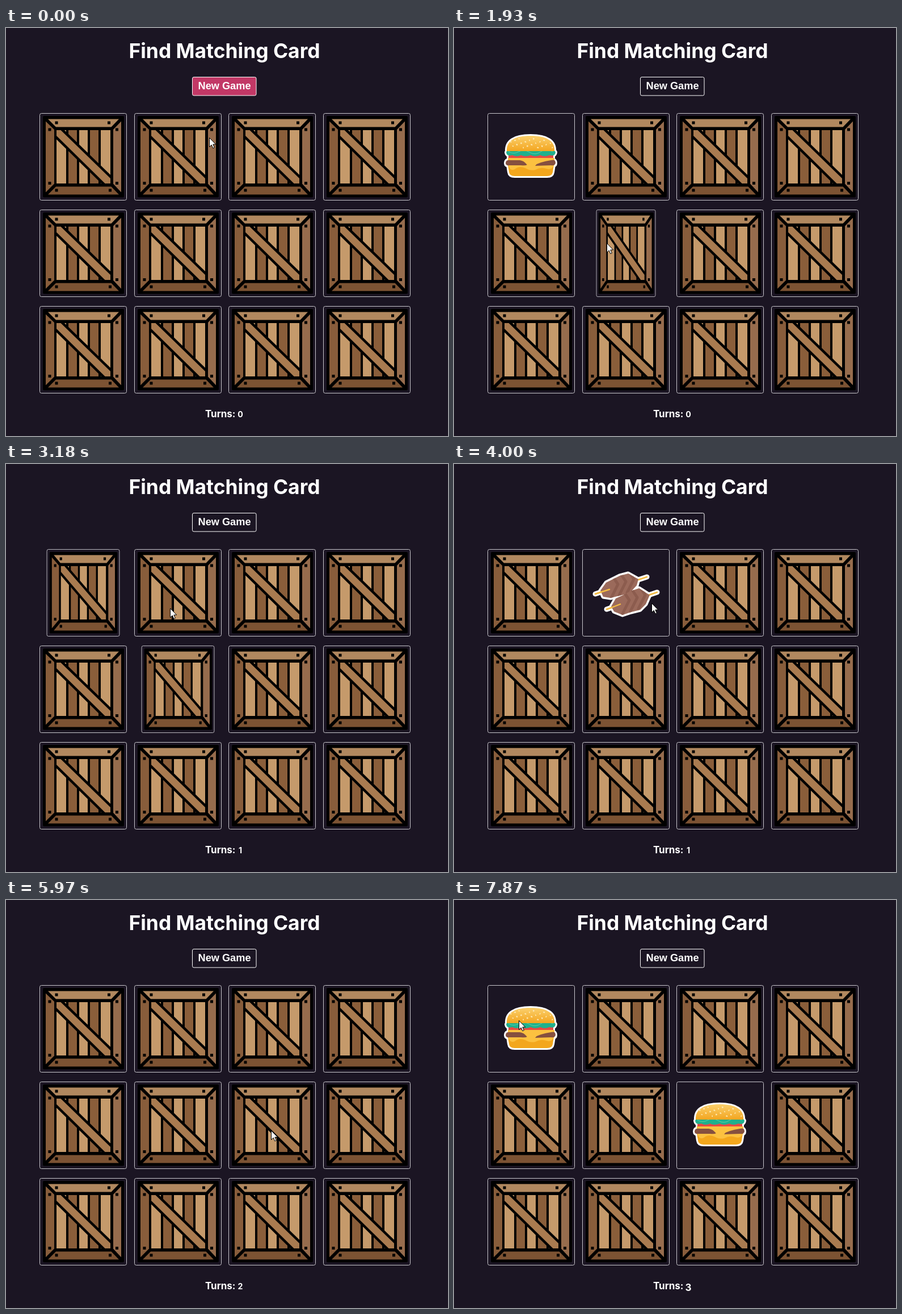
Recreate the animation shown at these times as an HTML page with a canvas. Size 779 px wide and 719 px high, loop 8 s.

```html
<!DOCTYPE html>
<html lang="en">
<head>
<meta charset="utf-8">
<title>Find Matching Card</title>
<style>
html, body { margin: 0; width: 779px; height: 719px; overflow: hidden; background: #1b1523; }
canvas { display: block; }
</style>
</head>
<body>
<canvas id="stage" width="779" height="719"></canvas>
<script>
const ctx = document.getElementById('stage').getContext('2d');
const LOOP = 8000, HALF_FLIP = 176, SIZE = 154;
const BG = '#1b1523';

// Card index, face, time it opens, time it closes
const FLIPS = [
  [0, burger, 562, 2872], [5, pizza, 1812, 2872],
  [1, kebab, 3182, 5572], [2, pizza, 4514, 5572],
  [6, burger, 6018, Infinity], [0, burger, 7515, Infinity],
];
const TURN_TIMES = [2850, 5555, 7525];

// Pointer stops: time, x, y; equal times make a jump
const STOPS = [
  [0, 358, 193], [30, 358, 193], [30, 329, 229], [155, 329, 229],
  [320, 126, 230], [1245, 126, 230], [1580, 269, 379], [2655, 269, 379],
  [3060, 289, 254], [4000, 289, 254], [4000, 347, 245], [4200, 476, 239],
  [5520, 476, 239], [5520, 464, 297], [5800, 467, 406], [6895, 467, 406],
  [7350, 114, 212], [LOOP, 114, 212],
];

function fill(color, d) {
  const path = new Path2D(d);
  ctx.fillStyle = color;
  ctx.fill(path);
}

function line(color, width, d) {
  ctx.strokeStyle = color;
  ctx.lineWidth = width;
  ctx.stroke(new Path2D(d));
}

function dot(color, x, y, rx, ry = rx, turn = 0) {
  ctx.fillStyle = color;
  ctx.beginPath();
  ctx.ellipse(x, y, rx, ry, turn, 0, 7);
  ctx.fill();
}

function box(color, x, y, w, h) {
  ctx.fillStyle = color;
  ctx.fillRect(x, y, w, h);
}

function clipped(d, draw) {
  ctx.save();
  ctx.clip(new Path2D(d));
  draw();
  ctx.restore();
}

function text(str, x, y, font, align = 'center') {
  ctx.font = font;
  ctx.textAlign = align;
  ctx.fillStyle = '#fff';
  ctx.fillText(str, x, y);
}

function crate() {
  ctx.fillStyle = '#000';
  ctx.beginPath();
  ctx.roundRect(6, 5, 143, 143.5, 2);
  ctx.fill();
  fill('#b1885f', 'M15 10.5H140L126.5 24.5H29Z');
  fill('#7c5333', 'M29 129.5H126.5L140 143.5H15Z');
  fill('#885d3b', 'M11 14.5L26 29V124.5L11 139.5Z');
  fill('#966c4d', 'M144 14.5L130 29V124.5L144 139.5Z');
  const light = '#c59a6b', dark = '#8a5e3a';
  [[30, 17, light], [51, 15, dark], [70, 15, light], [89, 15, dark], [108, 17, light]]
    .forEach(([x, w, color]) => box(color, x, 30, w, 94));
  clipped('M29 29H126V125H29Z', () => {
    const beam = 'M30 30H37.5L125 115V124H115.5L30 40Z';
    line('#000', 9, beam);
    fill('#a97b50', beam);
  });
  for (const [x, y] of [[30, 17], [122.5, 17], [18, 29], [136.5, 29],
    [18, 123.5], [136.5, 123.5], [30, 136], [124.5, 136]]) box('#000', x - 2.5, y - 2.5, 5, 5);
}

function burger() {
  ctx.translate(-59, -150);
  const bun = 'M93 217C92 200 105 190 135 190C165 190 178 200 177 217Z';
  const base = 'M95 241H176L174 254Q173 261 164 261H107Q98 261 97 254Z';
  const patty = 'M91 238Q91 232 99 232H172Q179 232 179 238Q179 243 172 243H98Q91 243 91 238Z';
  const leaf = 'M92 219Q94 213 103 215H168Q177 213 179 219Q178 227 168 224Q160 228 152 224Q143 228 135 224Q126 228 118 224Q110 228 103 224Q93 227 92 219Z';
  const red = 'M96 222H175V230H96Z';
  for (const d of [bun, base, patty, leaf, red]) {
    line('#fff', 6, d);
    fill('#fff', d);
  }
  fill('#f3a71d', base);
  fill('#fcc140', 'M96 242H176Q172 251 163 248Q153 244 143 250Q134 252 126 247Q115 242 107 249Q99 253 96 242Z');
  fill('#e84a43', red);
  fill('#fcc140', 'M95 229H177V242H95Z');
  fill('#86503f', 'M91 238Q91 232 100 233H116Q124 234 129 241Q126 243 118 242H98Q91 243 91 238Z');
  fill('#86503f', 'M140 243Q151 236 171 233Q179 231 179 238Q178 243 171 242Z');
  fill('#fcc140', 'M122 234H150L143 243Q136 248 130 242Z');
  fill('#20b08c', leaf);
  line('#58cfab', 1, 'M96 218Q105 223 114 218T133 219T153 218T174 218');
  const glow = ctx.createLinearGradient(0, 190, 0, 217);
  glow.addColorStop(0, '#fbd06c');
  glow.addColorStop(1, '#f3a51f');
  fill(glow, bun);
  clipped(bun, () => {
    for (let i = 0; i < 34; i++) {
      const x = 97 + (i * 29.3) % 77, y = 193 + (i * 7.7) % 18;
      dot('#fde9b4', x, y, 1.4, 0.9, i);
    }
  });
}

function kebab() {
  ctx.translate(-226, -150);
  const meats = [
    'M258 223L268 209L280 203L292 197L307 193L325 203L322 214L309 228L292 232L276 236L263 234Z',
    'M277 251L285 237L298 231L311 224L326 219L345 231L338 247L328 257L312 261L297 266L282 260Z',
  ];
  const sticks = ['M249 229L340 199', 'M269 256L358 226'];
  ctx.lineCap = 'round';
  sticks.forEach(d => line('#fff', 9, d));
  meats.forEach(d => line('#fff', 7, d));
  meats.forEach((d, i) => {
    line('#f2b93f', 2.6, sticks[i]);
    fill('#9b6a5b', d);
    clipped(d, () => {
      for (let k = 0; k < 3; k++) {
        const x = 282 + k * 14 + i * 20, y = 202 - k * 4.6 + i * 28;
        line('#8c5c4e', 5, `M${x - 3} ${y - 5}L${x + 7} ${y + 10}L${x - 5} ${y + 34}`);
      }
    });
  });
  line('#f5bd42', 2.4, 'M249 229L274 221');
  line('#f5bd42', 2.4, 'M270 256L293 247');
}

function pizza() {
  ctx.translate(-393, -150);
  const slice = 'M466 184Q493 184 506 204Q516 219 516 234L439 262Q437 263 438 260Z';
  line('#fff', 5.5, slice);
  fill('#fdc64a', slice);
  clipped(slice, () => {
    line('#f4aa32', 6, 'M466 183Q493 183 507 204Q517 219 517 235');
    for (const [x, y, r] of [[480, 214.5, 7.2], [457.5, 222.5, 7], [479, 237, 7], [456, 253, 6]])
      dot('#e6392f', x, y, r);
    for (const [x, y, a] of [[469, 203, -.5], [489, 227, .3], [459, 239, -.9], [450, 248, -.3], [471, 222, 1]]) {
      dot('#23ad82', x, y, 5, 2.1, a);
      dot('#fdc64a', x + 1, y - 2, 2.8, 1.2, a);
    }
    for (let i = 0; i < 18; i++)
      dot('#655034', 447 + (i * 23.7) % 60, 192 + (i * 17.3) % 62, 0.8);
  });
}

// Horizontal squash of one half turn, for progress 0..1
const turnAngle = p => Math.PI / 2 * Math.pow(Math.min(1, Math.max(0, p)), 1.65);
const squashOut = p => Math.cos(turnAngle(p));
const squashIn = p => Math.sin(turnAngle(p));

function face(x, y, squash, draw) {
  if (squash < 0.004) return;
  ctx.save();
  ctx.translate(x + SIZE / 2, y);
  ctx.scale(squash, 1);
  ctx.translate(-SIZE / 2, 0);
  ctx.lineJoin = 'round';
  ctx.strokeStyle = '#c9c7cd';
  ctx.lineWidth = 1;
  ctx.beginPath();
  ctx.roundRect(0.5, 0.5, SIZE - 1, SIZE - 1, 3);
  ctx.stroke();
  draw();
  ctx.restore();
}

function card(i, t) {
  const x = Math.floor(59.3 + (i % 4) * 166.8), y = Math.round(150.3 + Math.floor(i / 4) * 169.7);
  const flip = FLIPS.find(f => f[0] === i && t >= f[2] && t < f[3] + 2 * HALF_FLIP);
  if (!flip) return face(x, y, 1, crate);
  const [, food, opens, closes] = flip;
  const closing = t >= closes;
  const p = (t - (closing ? closes : opens)) / HALF_FLIP;
  const [from, to] = closing ? [food, crate] : [crate, food];
  if (p < 1) face(x, y, squashOut(p), from);
  else face(x, y, squashIn(p - 1), to);
}

function pointer(t) {
  const k = STOPS.findIndex(s => s[0] > t);
  const [t0, x0, y0] = STOPS[k - 1], [t1, x1, y1] = STOPS[k];
  const p = 1 - Math.pow(1 - (t - t0) / (t1 - t0), 2);
  ctx.save();
  ctx.translate(Math.round(x0 + (x1 - x0) * p), Math.round(y0 + (y1 - y0) * p));
  const arrow = 'M.5 .5V16.5L4.2 13L6.8 18.8L9.3 17.7L6.8 12H11.7Z';
  fill('#fff', arrow);
  line('#000', 1, arrow);
  ctx.restore();
}

function button(hover) {
  ctx.beginPath();
  ctx.roundRect(328.5, 86.5, 112.5, 32.5, 2.5);
  ctx.fillStyle = hover ? '#c23866' : BG;
  ctx.fill();
  ctx.strokeStyle = '#fff';
  ctx.lineWidth = 1;
  ctx.stroke();
  text('New Game', 385, 108, 'bold 18.2px "Liberation Sans", Arial, sans-serif');
}

function turns(t) {
  const count = TURN_TIMES.filter(at => t >= at).length;
  const low = count === 3;
  text('Turns:', 351, 686, 'bold 17px Inter, sans-serif', 'left');
  text(count, 413, low ? 689 : 686, `bold ${low ? 17 : 14.2}px Inter, sans-serif`);
}

function render() {
  const t = performance.now() % LOOP;
  box(BG, 0, 0, 779, 719);
  text('Find Matching Card', 385, 53, 'bold 35.4px Inter, sans-serif');
  button(t < 30);
  for (let i = 0; i < 12; i++) card(i, t);
  turns(t);
  pointer(t);
  requestAnimationFrame(render);
}
render();
</script>
</body>
</html>
```
